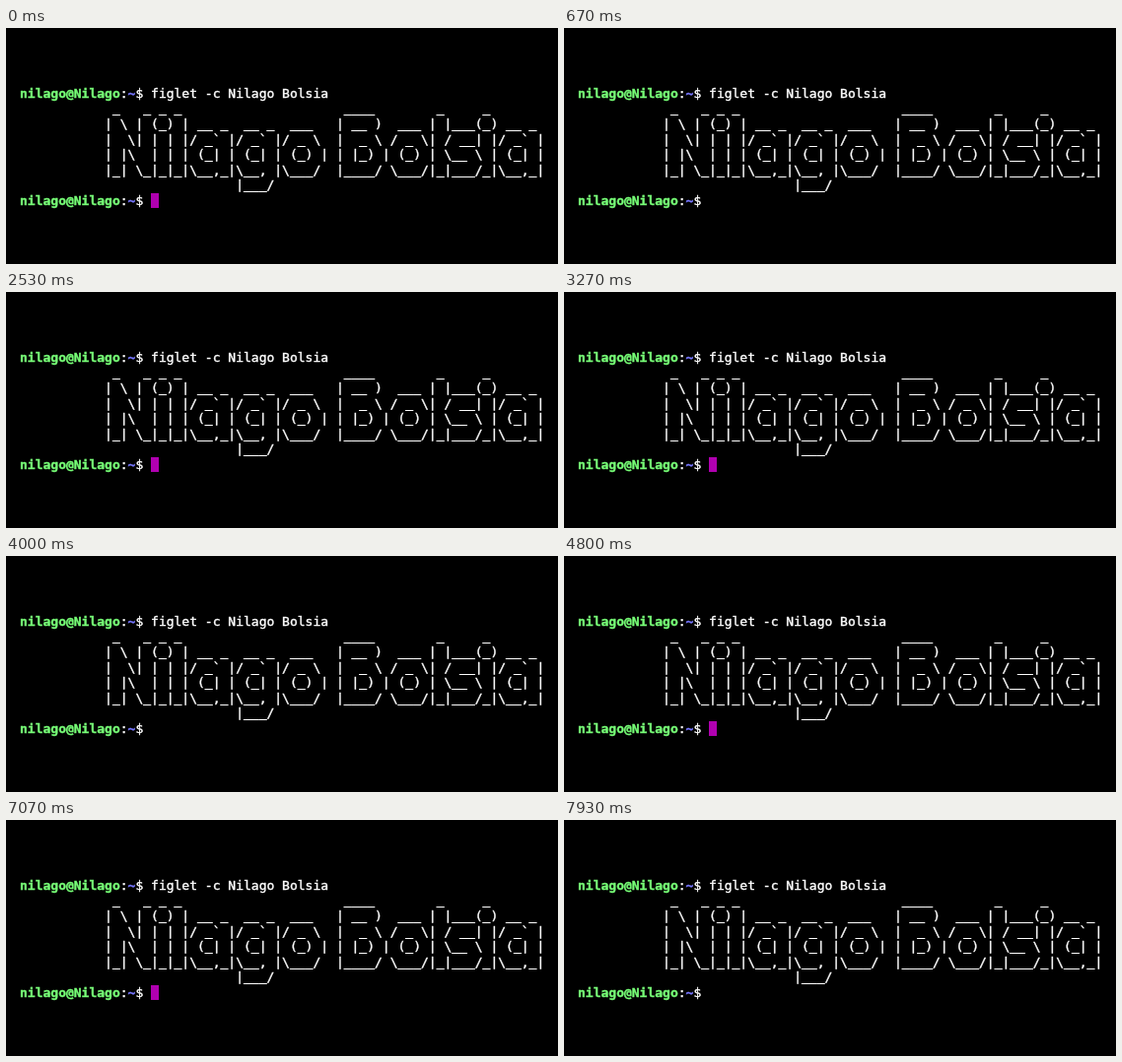
Write an HTML page that moves like this. It is 560 px wide and 240 px high and loops after 8 s.

```html
<!DOCTYPE html>
<html lang="es">
<head>
<meta charset="utf-8">
<title>Terminal</title>
<style>
  html, body {
    margin: 0;
    width: 100%;
    height: 100%;
    overflow: hidden;
    background: #000;
  }
  #screen {
    position: absolute;
    left: 14px;
    top: 58.8px;
    margin: 0;
    color: #fff;
    font: 13px/15.6px "DejaVu Sans Mono", monospace;
    font-variant-ligatures: none;
    white-space: pre;
    -webkit-text-stroke: .4px currentColor;
  }
  b { color: #7f7; }
  i { color: #77f; font-style: normal; font-weight: bold; }
  #cursor {
    position: absolute;
    left: 147px;
    top: 168px;
    width: 8px;
    height: 15px;
    background: #b000b0;
  }
</style>
</head>
<body>
<pre id="screen"><b>nilago@Nilago</b>:<i>~</i>$ figlet -c Nilago Bolsia
            _   _ _ _                     ____        _     _
           | \ | (_) | __ _  __ _  ___   | __ )  ___ | |___(_) __ _
           |  \| | | |/ _` |/ _` |/ _ \  |  _ \ / _ \| / __| |/ _` |
           | |\  | | | (_| | (_| | (_) | | |_) | (_) | \__ \ | (_| |
           |_| \_|_|_|\__,_|\__, |\___/  |____/ \___/|_|___/_|\__,_|
                            |___/
<b>nilago@Nilago</b>:<i>~</i>$ </pre>
<div id="cursor"></div>
<script>
  const LOOP = 8000;
  const BLINK = 1200;     // half on, half off
  const BLINK_LEAD = 400; // the loop opens partway through an "on" half
  const cursor = document.getElementById("cursor");
  const start = performance.now();

  function draw(now) {
    const time = Math.max(0, now - start) % LOOP;
    const visible = (time + BLINK_LEAD) % BLINK < BLINK / 2;
    cursor.style.visibility = visible ? "visible" : "hidden";
    requestAnimationFrame(draw);
  }
  draw(start);
</script>
</body>
</html>
```
